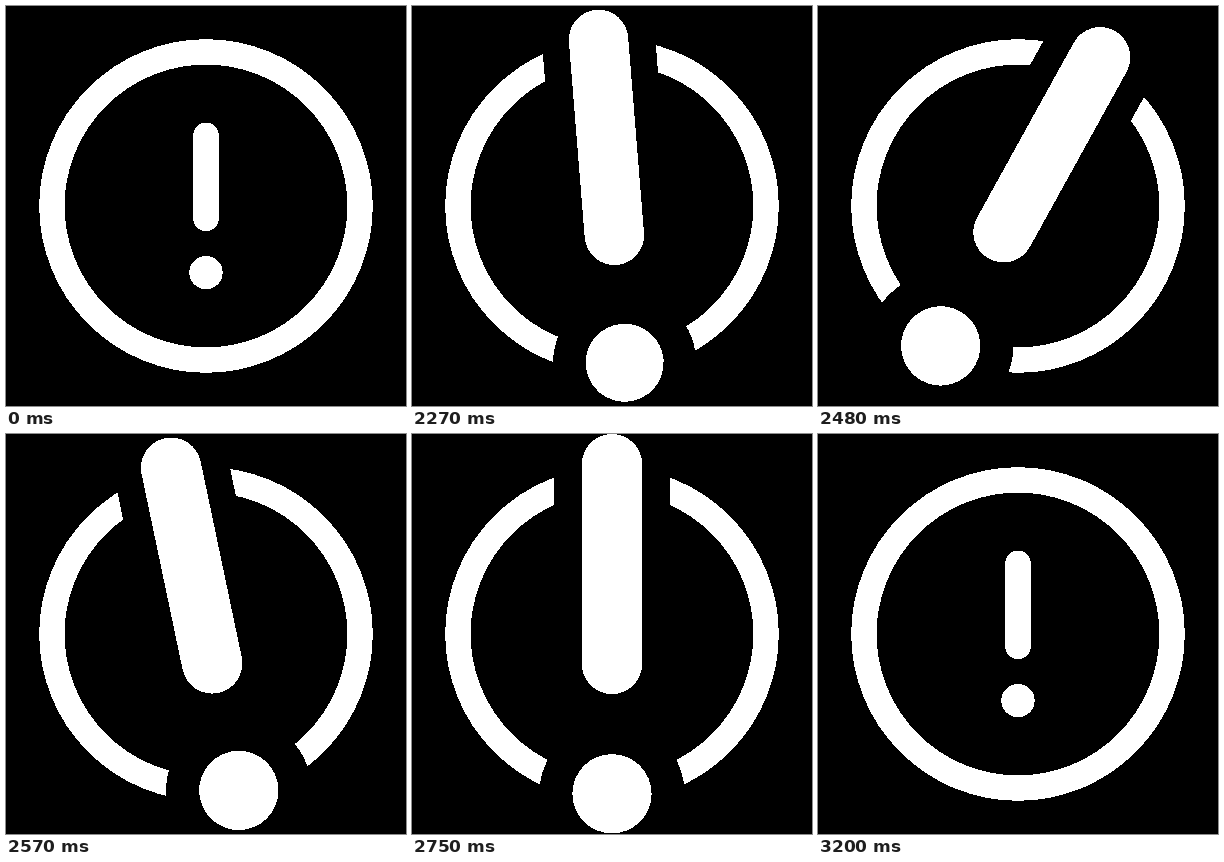
An HTML page for the animation above (3.23 s loop, 400 by 400 pixels).

```html
<!DOCTYPE html>
<html lang="en">
<head>
<meta charset="utf-8">
<title>Alert icon</title>
<style>
  html, body { margin: 0; width: 100%; height: 100%; overflow: hidden; background: #000; }
  svg { display: block; width: 100vw; height: 100vh; }
</style>
</head>
<body>
<svg viewBox="0 0 400 400" shape-rendering="crispEdges">
  <rect width="400" height="400" fill="#000"/>
  <circle cx="200" cy="200" r="154.1" fill="none" stroke="#fff" stroke-width="25.4"/>
  <g id="mark" stroke-linecap="round">
    <line id="barGap" stroke="#000"/>
    <circle id="dotGap" fill="#000"/>
    <line id="bar" stroke="#fff"/>
    <circle id="dot" fill="#fff"/>
  </g>
</svg>
<script>
  const LOOP = 3230, STEP = 30, OFFSET = 20;
  const TOP = -70.8, BOTTOM = 12.5, DOT = 66.6;

  // Keyframes: [time in ms, value]
  const SCALE = [[2017, 1], [2298, 2.4], [2742, 2.4], [3194, 1]];
  const ANGLE = [[2239, 0], [2364, -30], [2490, 30], [2616, -30], [2742, 0]];

  const [mark, barGap, dotGap, bar, dot] =
    ["mark", "barGap", "dotGap", "bar", "dot"].map(id => document.getElementById(id));

  const ease = p => p * p * (3 - 2 * p);

  function valueAt(keys, t) {
    if (t <= keys[0][0]) return keys[0][1];
    for (let i = 1; i < keys.length; i++) {
      const [t0, a] = keys[i - 1], [t1, b] = keys[i];
      if (t < t1) return a + (b - a) * ease((t - t0) / (t1 - t0));
    }
    return keys[keys.length - 1][1];
  }

  function set(el, attrs) {
    for (const name in attrs) el.setAttribute(name, attrs[name]);
  }

  function setLine(el, s, half) {
    set(el, { x1: 0, x2: 0, y1: TOP * s, y2: BOTTOM * s, "stroke-width": 2 * half });
  }

  function draw(t) {
    const s = valueAt(SCALE, t);
    set(mark, { transform: `translate(200 200) rotate(${valueAt(ANGLE, t)})` });
    setLine(barGap, s, 24 * s);
    setLine(bar, s, 0.2 + 12.5 * s);
    set(dotGap, { cy: DOT * s, r: 30.3 * s });
    set(dot, { cy: DOT * s, r: 0.3 + 16.4 * s });
  }

  const start = performance.now();

  function tick() {
    const t = (performance.now() - start) % LOOP;
    draw(Math.floor((t - OFFSET) / STEP) * STEP + OFFSET);
    requestAnimationFrame(tick);
  }

  tick();
</script>
</body>
</html>
```
